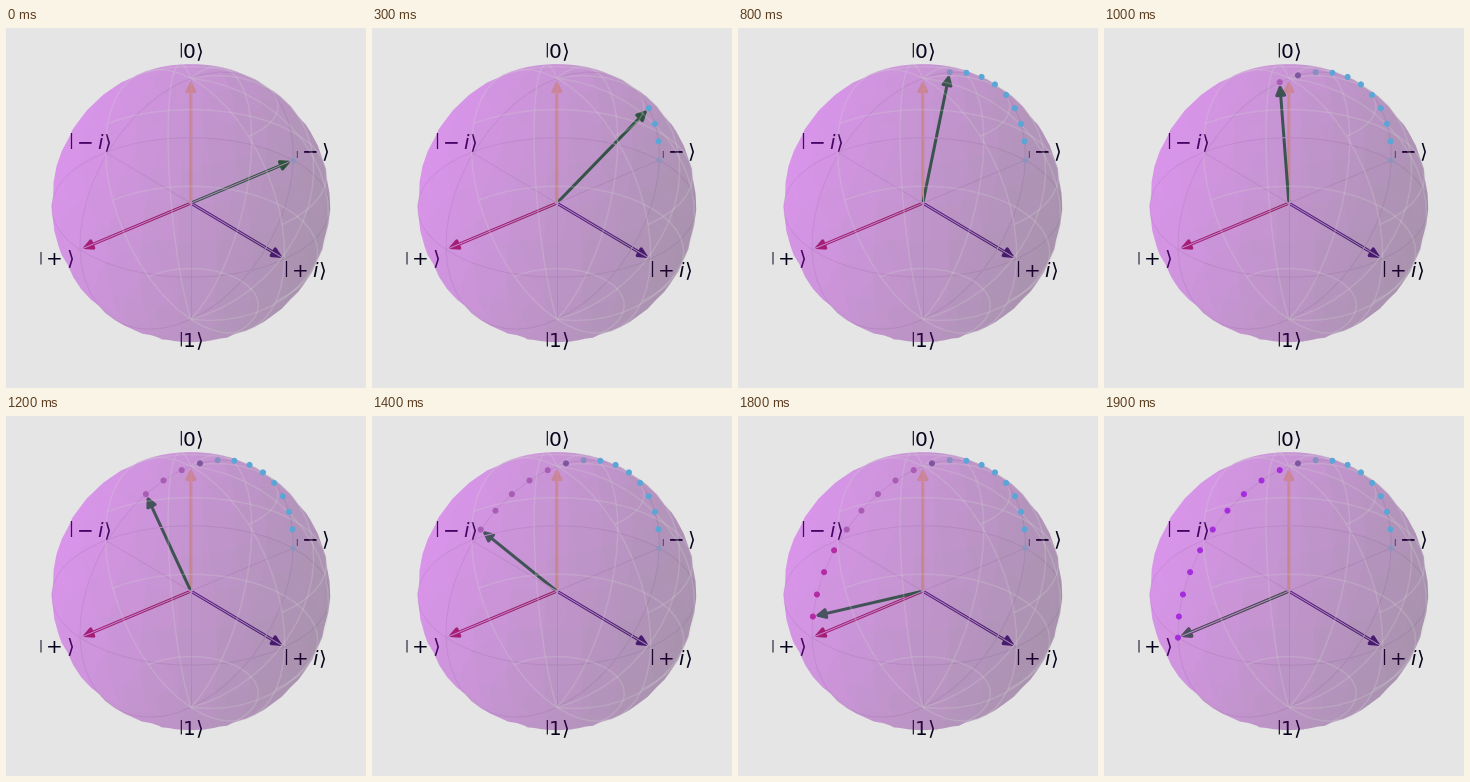
These frames come from a looping animation (360 px wide and 360 px high, 2 s). A matplotlib script:

```python
from itertools import product

import numpy as np
import matplotlib.pyplot as plt
from matplotlib.animation import FuncAnimation
from matplotlib.collections import LineCollection, PolyCollection
from matplotlib.patches import FancyArrowPatch

STEPS = 20
RADIUS = 139.0
CENTER = np.array([184.86, 175.14])
AZIM, ELEV = np.radians([-40, 30])

# Camera basis, and the direction the light comes from
RIGHT = np.array([-np.sin(AZIM), np.cos(AZIM), 0])
VIEW = np.array([np.cos(ELEV) * np.cos(AZIM),
                 np.cos(ELEV) * np.sin(AZIM), np.sin(ELEV)])
UP = np.cross(VIEW, RIGHT)
LIGHT = np.array([-2, -2, 1]) / 3

BACKDROP = "#e5e5e5"
FRAME = "lightgray"
INK = "#06041c"
VIOLET = np.array([200, 8, 248]) / 255
BLUE, STEEL, PLUM = "#5aa6d6", "#858fc0", "#7d569f"
MAUVE, MAGENTA, PURPLE = "#a85cb4", "#b42ca4", "#a52cdc"


def project(points):
    """Perspective view of world points, in pixels with y downwards."""
    p = np.asarray(points, float)
    scale = RADIUS / (1 - p @ VIEW / 14)
    offset = np.stack([p @ RIGHT, -(p @ UP)], -1)
    return CENTER + offset * scale[..., None]


def bloch(x, y, z):
    return np.stack(np.broadcast_arrays(y, -np.asarray(x), z), -1)


def half_sphere(start):
    u = np.linspace(start, start + np.pi, 25)
    v = np.linspace(0, np.pi, 25)
    return np.stack([np.outer(np.cos(u), np.sin(v)),
                     np.outer(np.sin(u), np.sin(v)),
                     np.outer(np.ones(25), np.cos(v))], -1)


def add_surface(grid, z):
    flat = project(grid)
    ring = [(0, 0), (0, 1), (0, 2), (1, 2), (2, 2), (2, 1), (2, 0), (1, 0)]
    faces, colors = [], []
    for i, j in product(range(0, 24, 2), repeat=2):
        faces.append([flat[i + a, j + b] for a, b in ring])
        shade = 0.65 + 0.35 * (grid[i + 1, j + 1] @ LIGHT)
        colors.append((*np.clip(VIOLET * shade, 0, 1), 0.2))
    ax.add_collection(PolyCollection(faces, facecolors=colors,
                                     linewidths=0, zorder=z))


def add_wire(grid, z):
    flat = project(grid)
    picks = [0, 5, 10, 15, 20, 24]
    lines = [flat[k] for k in picks] + [flat[:, k] for k in picks]
    ax.add_collection(LineCollection(lines, colors=FRAME, linewidths=1.5,
                                     alpha=0.25, zorder=z))


def add_line(points):
    xy = project(points)
    ax.plot(xy[:, 0], xy[:, 1], color=FRAME, lw=1, zorder=2)


def add_arrow(tip, color):
    arrow = FancyArrowPatch(CENTER, project(tip), arrowstyle="-|>",
                            mutation_scale=20, lw=3, color=color, zorder=1)
    ax.add_patch(arrow)
    return arrow


def add_label(body, *pos):
    x, y = project(1.2 * bloch(*pos))
    ax.text(x, y, r"$\left|%s\right\rangle$" % body, fontsize=20, color=INK,
            ha="center", va="center", zorder=3)


def dot_color(k, step):
    if k < 8:
        return BLUE
    if k < 10:
        return STEEL if k == 8 else PLUM
    if step == STEPS - 1:
        return PURPLE
    return MAUVE if k < 15 else MAGENTA


fig = plt.figure(figsize=(5, 5), dpi=72, facecolor=BACKDROP)
ax = fig.add_axes([0, 0, 1, 1])
ax.set_xlim(0, 360)
ax.set_ylim(360, 0)
ax.set_axis_off()

# The state swings over the pole from one end of the x axis to the other
angle = np.pi * np.arange(STEPS) / (STEPS - 1)
path = project(bloch(-np.cos(angle), 0, np.sin(angle)))

add_arrow(bloch(0, 0, 1), "#e8cd87")
add_arrow(bloch(1, 0, 0), "#a52a43")
add_arrow(bloch(0, 1, 0), "#422873")
state = add_arrow(bloch(-1, 0, 0), "#10801c")

for axis in np.eye(3):
    add_line(np.array([-axis, axis]))
turn = np.linspace(0, 2 * np.pi, 49)
c, s, o = np.cos(turn), np.sin(turn), 0 * turn
add_line(np.stack([c, s, o], -1))
add_line(np.stack([o, c, s], -1))

for label in [("0", 0, 0, 1), ("1", 0, 0, -1), ("+", 1, 0, 0),
              ("-", -1, 0, 0), ("+i", 0, 1, 0), ("-i", 0, -1, 0)]:
    add_label(*label)

back, front = half_sphere(0), half_sphere(-np.pi)
add_surface(back, 4)
add_surface(front, 5)
add_wire(back, 6)
dots = ax.scatter([], [], s=25, zorder=7)


def update(step):
    state.set_positions(CENTER, path[step])
    dots.set_offsets(path[:step + 1])
    colors = [(dot_color(k, step), 1 if k else 0.3) for k in range(step + 1)]
    dots.set_facecolor(colors)
    dots.set_edgecolor(colors)
    return state, dots


anim = FuncAnimation(fig, update, frames=STEPS, interval=100,
                     init_func=lambda: update(0), repeat=True, blit=False)
plt.show()
```
